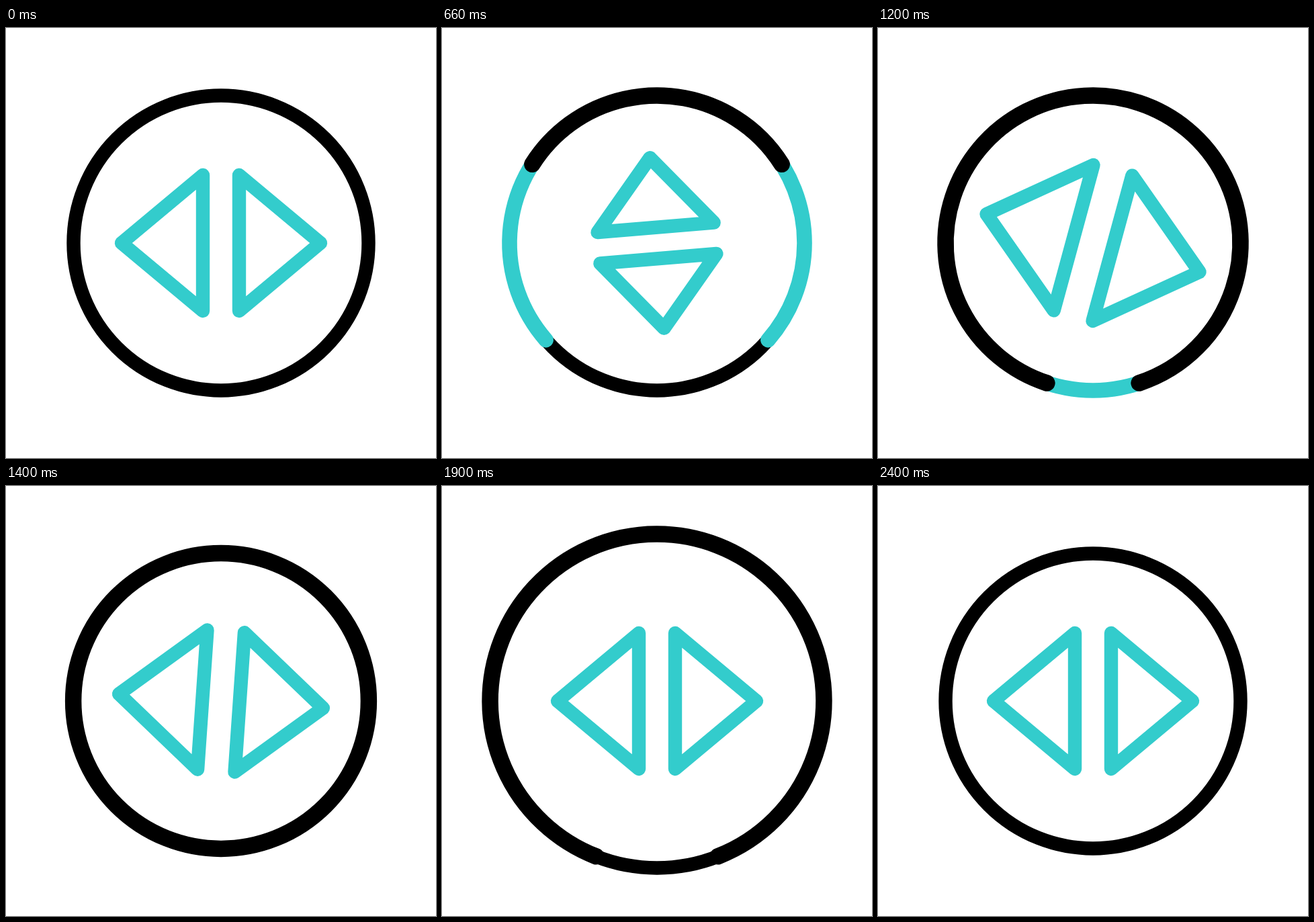
Animation, 640 px wide and 640 px high, one loop 2420 ms. Source, as an HTML page with a canvas:

```html
<!DOCTYPE html>
<html>
<head>
<meta charset="utf-8">
<style>
  html, body { margin: 0; width: 100%; height: 100%; overflow: hidden; background: #fff; }
  canvas { display: block; }
</style>
</head>
<body>
<canvas width="640" height="640"></canvas>
<script>
const LOOP = 2420, RADIUS = 219.5, TEAL = '#33cccc';
const ctx = document.querySelector('canvas').getContext('2d');

const progress = (t, start, length) => Math.min(1, Math.max(0, (t - start) / length));

// Near-linear sweep that slows slightly towards its end.
const sweep = (t, start, length, bend) => {
  const u = progress(t, start, length);
  return Math.PI * (u + bend * u * (1 - u));
};

// Cubic bezier (.5, 0, .5, 1), solved for x by bisection.
function ease(u) {
  let low = 0, high = 1;
  for (let i = 0; i < 20; i++) {
    const s = (low + high) / 2;
    if (1.5 * s * (1 - s) + s ** 3 < u) low = s; else high = s;
  }
  return low * low * (3 - 2 * low);
}

// Keys are [time, value] pairs, eased in between.
function animate(t, keys) {
  let value = keys[0][1];
  for (let i = 1; i < keys.length; i++) {
    const [t0, v0] = keys[i - 1], [t1, v1] = keys[i];
    if (t >= t0) value = v0 + (v1 - v0) * ease(progress(t, t0, t1 - t0));
  }
  return value;
}

const SPIN = [[145, 0], [776, 90], [1200, 195.2], [1520, 180]];
const ZOOM = [[145, 1], [776, 0.852], [1200, 1.11], [1520, 1]];
const SWELL = [[1365, 1], [1765, 1.146], [1800, 1.146], [2220, 1]];

// Arc centred on the top, reaching the given angle on both sides.
function arc(radius, reach, width, color) {
  ctx.beginPath();
  ctx.arc(0, 0, radius, -Math.PI / 2 - reach, -Math.PI / 2 + reach);
  ctx.lineWidth = width;
  ctx.strokeStyle = color;
  ctx.stroke();
}

function triangles(angle, scale) {
  const c = Math.cos(angle) * scale, s = Math.sin(angle) * scale;
  ctx.lineWidth = 20.4;
  ctx.strokeStyle = TEAL;
  for (const side of [-1, 1]) {
    ctx.beginPath();
    for (const [x, y] of [[148, 0], [27, -101], [27, 101]])
      ctx.lineTo(side * x * c - y * s, side * x * s + y * c);
    ctx.closePath();
    ctx.stroke();
  }
}

function draw(t) {
  ctx.setTransform(1, 0, 0, 1, 0, 0);
  ctx.fillStyle = '#fff';
  ctx.fillRect(0, 0, 640, 640);
  ctx.translate(320, 320);
  ctx.lineCap = ctx.lineJoin = 'round';

  const radius = RADIUS * animate(t, SWELL);
  arc(radius, Math.PI, 20.4, '#000');
  if (t >= 20 && t < 1330) arc(radius, sweep(t, 20, 920, 0.15), 22.6, TEAL);
  if (t >= 420 && t < 2400)
    arc(radius, sweep(t, 420, 900, 0.27) - sweep(t, 1845, 555, 0.2), 24.5, '#000');

  triangles(animate(t, SPIN) * Math.PI / 180, animate(t, ZOOM));
}

function tick() {
  draw(performance.now() % LOOP);
  requestAnimationFrame(tick);
}
tick();
</script>
</body>
</html>
```
